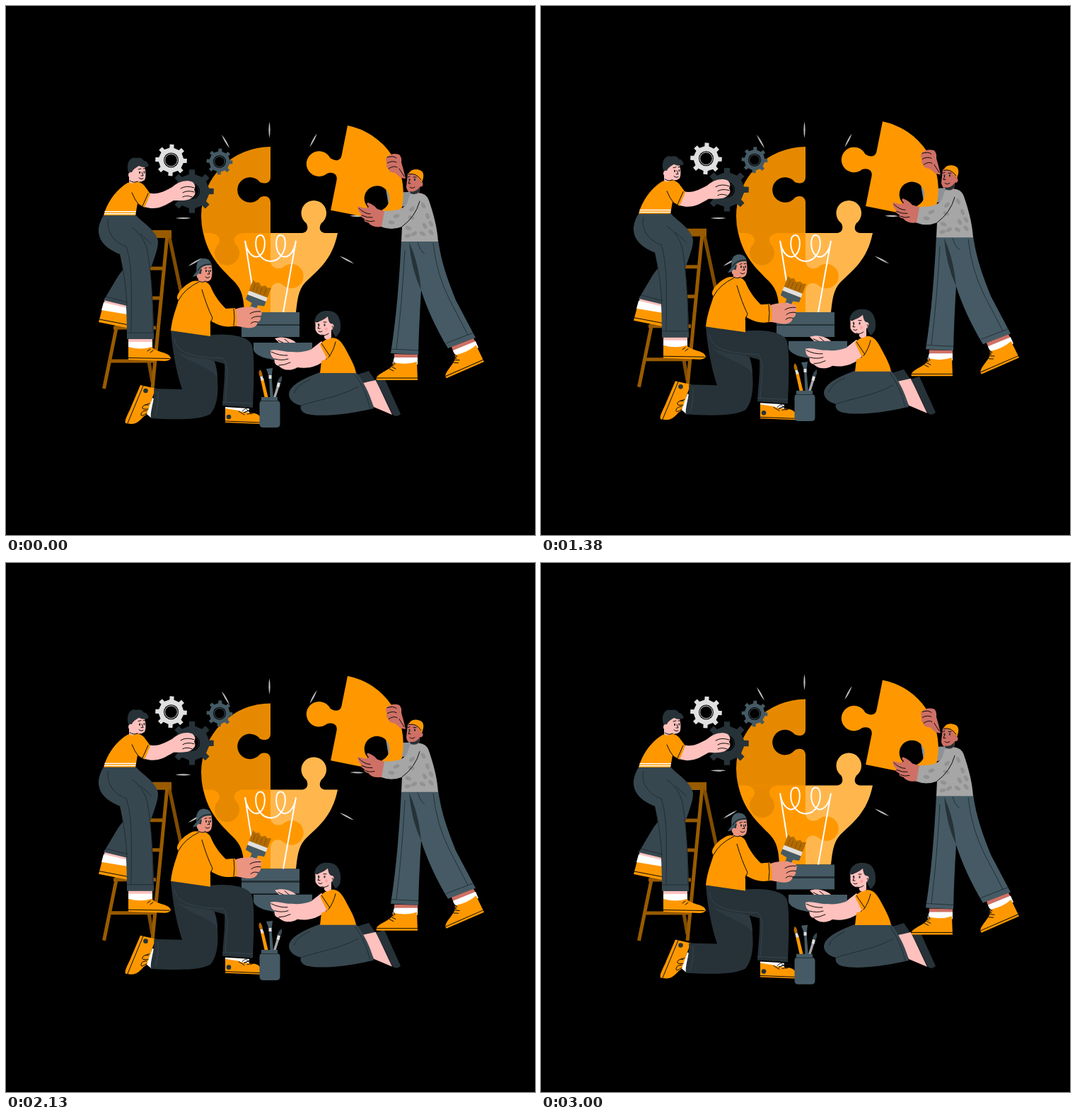
Write an HTML page that moves like this. It is 748 px wide and 748 px high and loops after 3040 ms.

```html
<!DOCTYPE html>
<html lang="en">
<head>
<meta charset="utf-8">
<title>Building an idea</title>
<style>
  html, body { margin: 0; width: 100%; height: 100%; overflow: hidden; background: #000; }
  svg { display: block; width: 100vw; height: 100vh; }
  .or { fill: #ff9800; } .or2 { fill: #e68900; } .or3 { fill: #ffb74d; }
  .dk { fill: #263238; } .md { fill: #37474f; } .sl { fill: #455a64; }
  .pk { fill: #ffc1bd; } .tan { fill: #eb9481; } .br { fill: #ce7065; }
  .gr { fill: #a6a6a6; } .wh { fill: #fff; } .lt { fill: #e0e0e0; }
  .ln { fill: none; stroke: #0b0b0b; stroke-width: 1; stroke-linecap: round; stroke-linejoin: round; }
  .seam { fill: none; stroke: #1c262b; stroke-width: .8; }
  .seam2 { fill: none; stroke: #3a4a52; stroke-width: .8; }
  .wood { fill: none; stroke: #995b00; stroke-width: 5; }
  .back { stroke: #804c00; }
  .wire { fill: none; stroke: #fff; stroke-width: 2; stroke-linecap: round; }
</style>
</head>
<body>
<svg viewBox="0 0 748 748">
  <defs>
    <g id="shoe">
      <path class="or" d="M0 0H-58C-61-7-47-11-38-18L-34-25Q-16-21-1-26Z"/>
      <path class="ln" d="M0-3H-58M-34-20q-10-11-11-8t10 7q-10 3-12 2M-32-22q-4-9-6-8t4 8M-40-16l6 3M-37-19l6 3"/>
    </g>
  </defs>

  <g id="bulb">
    <g id="rays" fill="#bdbdbd"></g>
    <path class="or2" d="M374 199V242C374 251 366 252 359 249A17.8 17.8 0 1 0 359 271C366 267 374 269 374 278V322H279Q276 310 276 297A98 98 0 0 1 374 199Z"/>
    <path class="or" d="M279 321H374V433H337C336 414 334 402 324 391C308 374 287 358 279 321Z"/>
    <path class="or2" d="M287 321C296 321 305 326 301 336A17.5 17.5 0 1 0 324 336C320 326 328 321 338 321Z"/>
    <path class="or3" d="M374 321H417C427 321 428 313 424.500 307A17.800 17.800 0 1 1 446 307C442 313 443 321 453 321H469C461 360 441 373 423 391C413 402 412 416 410 433H374Z"/>
    <path class="or" d="M374 361C375 370 383 373 391 370A17.300 17.300 0 1 1 391 394C383 389 375 393 374 403Z"/>
    <path class="wire" d="M354 433L338 332C341 352 352 358 359 353C368 346 368 324 360 324C351 324 352 342 357 350C362 358 368 361 374 361C381 361 387 357 391 350C396 342 397 324 388 324C380 324 380 346 389 353C396 358 407 352 410 332L392 433"/>
    <path class="sl" d="M333 433H415V450H333ZM333 452H415V468H333Z"/>
    <path class="dk" d="M333 450H415V452H333Z"/>
  </g>

  <g id="climber">
    <path class="wood back" d="M230 322L249 412M202 503L207 532"/>
    <path class="wood" d="M182 328L138.500 541M228 324L207 541M196 371H221M192 413H217M152 455H212M146 502H210"/>
    <path fill="#995b00" d="M180 317H234V328H180Z"/>
    <g id="gears"></g>
    <path class="or" d="M136 428L171 435V455L131 447Z"/>
    <path class="ln" d="M132 443L171 450.500"/>
    <path class="pk" d="M140 413L171 420V430L138 424Z"/>
    <path class="wh" d="M138 419L171 427V436L135 430Z"/>
    <path class="md" d="M213 345C206 375 190 402 171 424L138 416C150 398 155 385 166 372L180 330Z"/>
    <path class="md" d="M150 296H184C190 304 213 317 215 333C215 345 210 355 204 367L180 345Z"/>
    <path class="md" d="M138 296H180C190 312 199 330 201 350C206 385 209 430 209 471H171C171 430 169 385 161 351C146 345 129 334 131 314Q133 303 138 296Z"/>
    <path class="seam" d="M178 313C190 322 199 335 201 352C206 385 208 430 208 462M171 462H209M145 301C141 318 152 334 170 340C180 370 177 420 177 461M190 322L206 337M141 411L172 419M164 365C168 385 170 405 171 424"/>
    <path class="pk" d="M173 471H207V478H173Z"/>
    <path class="wh" d="M173 475H207V486H173Z"/>
    <path class="or" d="M173 482Q191 487 206 482C212 490 231 489 233 498Q231 502 224 502L173 500Z"/>
    <path class="ln" d="M173 497.500L231 498.500M204 485l-4 3M208 487l-4 3"/>
    <path class="pk" d="M201 264C213 268 224 262 235 256C244 248 256 245 264 249C268 253 268 256 266 260C269 264 267 268 264 270C259 276 246 275 237 275C222 284 211 290 193 283Z"/>
    <path class="ln" d="M266 257Q255 253 247 258M266 263Q256 260 250 264M263 270Q255 267 250 270"/>
    <path class="or" d="M138 296C143 278 155 260 172 250C183 246 193 249 197 256Q201 261 204 266L196 285L186 279L183 296Z"/>
    <path class="wh" d="M139.500 290H184V291.500H139.500ZM139 293H183.500V294.500H139Z"/>
    <path class="ln" d="M178 264Q182 274 187 280M201 265L193 283"/>
    <path class="pk" d="M174 230Q185 219 196 227Q199 240 196 246Q191 250 184 248Q178 253 174 249Z"/>
    <path class="dk" d="M175 239C171 232 171 224 174 219Q178 213 184 215Q192 213 195 219Q199 218 202 226Q195 230 188 226Q181 230 179 233Q177 238 175 239Z"/>
    <circle class="pk" cx="177" cy="239" r="4"/>
    <path class="ln" d="M187 231l4-1M194 230l3 0M192 235l2 5-3 0M188 243q3 3 6 1M175 247q6 4 11 1"/>
    <path class="dk" d="M188 234h2v3h-2ZM194.500 233.500h1.800v3h-1.800Z"/>
  </g>

  <g id="painter">
    <path class="or" d="M190 536L212 541C208 551 205 557 204 566C203 575 198 578 194 581C188 588 183 591 177 591L169 590C167 585 173 577 178 564Z"/>
    <path class="wh" d="M207 554L211 556L206 583L199 577Z"/>
    <path class="ln" d="M194 537L172 590M201 564q-6-1-8 3t8 3M199 572q-7 0-8 5t8-1M203 562l-6 2"/>
    <circle class="dk" cx="197.500" cy="544" r="3.300"/>
    <path class="dk" d="M233 458L290 465C315 463 343 466 348 480C352 498 350 535 349 568L306 565C307 545 310 525 309 506L295 502C300 523 304 560 289 577C273 586 235 585 205 583C203 573 211 557 209 541L249 542C240 515 235 485 233 458Z"/>
    <path fill="#2d3a41" d="M243 490C265 500 287 496 295 504Q299 514 299 526C289 510 260 506 243 490Z"/>
    <path class="seam2" d="M238 469C240 487 255 497 307 498Q313 505 313 520L310 560M306 560L349 562M215 545Q216 565 211 579"/>
    <path class="wh" d="M310 567L344 569V577H310Z"/>
    <path class="or" d="M310 569L329 572C338 577 356 572 360 582V591L310 589Z"/>
    <path class="ln" d="M310 587L360 589M334 573q6-6 10-4t-8 6q14-6 18-3t-13 5M329 573l8 5M340 570l7 7"/>
    <circle class="dk" cx="315" cy="581" r="3.300"/>
    <g transform="translate(354.500 413) rotate(21)">
      <path fill="#b36b00" d="M-14-5V-22L-9-20L-5-22L0-18L5-21L9-19L14-21V-5Z"/>
      <path class="lt" d="M-14-6H14V0H-14Z"/>
      <path class="sl" d="M-14 0H14V7Q9 8 5 9V24H-4V9Q-10 8-14 7Z"/>
      <path class="ln" d="M-9-8v-9M-4-8v-8M2-8v-8M8-8v-9" opacity=".25"/>
      <path class="lt" d="M-3 14H4V25H-3Z"/>
    </g>
    <path class="tan" d="M322 430C333 424 349 425 358 428C363 431 362 436 360 439C361 444 358 446 356 447C355 454 348 456 340 455L322 452Z"/>
    <path class="ln" d="M360 432Q351 431 345 435M360 439Q351 438 347 442M356 447Q350 445 346 449"/>
    <path class="or" d="M233 459C235 440 241 427 244 416C238 412 246 400 257 393Q267 386 274 390Q283 387 289 396C294 409 304 422 311 428L324 427Q328 440 326 452C310 456 300 451 289 445V467Z"/>
    <path class="ln" d="M273 390Q252 400 244 416M277 401Q284 425 292 441L289 449M322 428Q324 440 322 452"/>
    <path class="tan" d="M270 370L290 364Q293 378 290 386Q286 391 281 389Q277 393 272 389Z"/>
    <path class="dk" d="M269 372H277L275 382L271 386Q268 380 269 372Z"/>
    <path class="sl" d="M270 375C267 362 274 356 281 357Q289 357 291 367Q281 366 276 371L272 381L264 383Q266 379 270 375Z"/>
    <circle class="tan" cx="273.500" cy="382" r="3.600"/>
    <path class="ln" d="M271 374Q276 364 290 365M281 371l3-1M287 370l3 0M286 374l2 5-3 0M282 383q3 3 6 0M273 389q5 3 9 0"/>
    <path class="dk" d="M282 373h2v3h-2ZM288 373h1.800v3h-1.800Z"/>
  </g>

  <g id="girl">
    <path class="pk" d="M380 470C391 466 405 470 411 477H387ZM432 485L446 474L452 482L436 494Z"/>
    <path class="ln" d="M385 473l9 4M394 471l7 6"/>
    <path class="sl" d="M350 476H433V485C431 494 412 501 392 501C370 501 350 494 350 485Z"/>
    <path class="dk" d="M497 521L513 516L523 531L506 536Z"/>
    <path class="pk" d="M505 533L523 529L546 578L520 567Z"/>
    <path class="dk" d="M523 530L535 526L558 577Q552 583 546 577Q537 556 523 530Z"/>
    <path class="md" d="M444 518H495C503 527 515 548 520 569C490 576 450 582 426 577C416 574 416 567 417 565C408 563 400 557 400 549C401 535 425 525 444 518Z"/>
    <path class="seam" d="M417 565C440 557 475 552 498 538M494 522Q508 541 515 569M430 528Q410 537 407 548"/>
    <path class="pk" d="M374 487C382 484 396 490 404 489C420 491 436 486 446 477L460 489C449 509 428 514 412 511C402 517 391 515 386 509C379 508 379 501 380 499C374 496 374 490 374 487Z"/>
    <path class="ln" d="M375 489Q387 495 398 494M380 499Q390 502 399 499M386 508Q394 508 402 504"/>
    <path class="or" d="M444 479Q449 472 457 470C466 467 473 472 479 483C488 500 493 508 495 519H444L446 502L454 499Z"/>
    <path class="ln" d="M446 477L458 495M456 497Q463 488 466 475"/>
    <path class="dk" d="M437 450C434 439 444 430 454 431C468 430 474 442 473 455Q473 463 466 468Q461 460 457 452Z"/>
    <path class="pk" d="M437.500 447Q447 446 455 439Q456 447 459 449Q465 449 463 455Q462 458 460 458V469Q453 474 450 469V466Q441 466 437.500 458Z"/>
    <path class="ln" d="M439 447l3-1M449 447l4 0M443 451l-2 5 3 0M442 460q3 2 5 0M446 465q6 2 10-2M461 453q2-1 1 3"/>
    <path class="dk" d="M441 449h1.800v3h-1.800ZM449.500 449.500h2v3h-2Z"/>
    <circle cx="453" cy="457" r="2.400" fill="#fba9a4"/>
  </g>

  <g id="carrier">
    <path class="sl" d="M559 331H611C616 365 625 388 636 416L664 469L625 484C609 458 594 425 587 402Q584 450 583 493L544 491C552 440 556 390 559 331Z"/>
    <path class="dk" d="M570 334L575 346Q584 370 587 402Q573 372 570 334Z"/>
    <path class="seam" d="M544 485L583 487M622 477L661 462M582 334Q586 347 592 350M604 335Q609 380 627 415L653 465M564 345Q560 420 552 485"/>
    <path class="br" d="M549 492L582 493V500H549ZM630 482L661 470L665 477L633 490Z"/>
    <path class="wh" d="M549 497H582V507L546 506ZM632 487L664 474L668 483L637 499Z"/>
    <use href="#shoe" x="582" y="529"/>
    <use href="#shoe" transform="translate(676 503) rotate(-23.600)"/>
    <path fill="#8c9298" d="M537 258Q552 266 578 262L580 278Q560 287 541 282Z"/>
    <path class="or" transform="translate(483 169) rotate(11.300)" d="M0 0A98 98 0 0 1 98 98Q98 110 95 122H79C69 122 68 114 71.700 107A17.800 17.800 0 1 0 50 107C54 114 53 122 43 122H0V79C0 70-8 68-15 72A17.800 17.800 0 1 1-15 50C-8 53 0 52 0 43Z"/>
    <path class="br" d="M539 213Q546 207 556 210Q560 214 559 221Q562 231 565 244L558 243L550 236Q540 235 541 230Q536 227 539 222Q535 217 539 213Z"/>
    <path class="ln" d="M539 214Q548 211 552 215M539 222Q547 218 552 221M541 230Q548 225 553 228M556 230l7 11"/>
    <path class="gr" d="M571 267C584 261 595 265 598 275C605 295 610 315 611 333H559L560 312Q545 318 530 312L534 290C548 289 560 290 567 279Z"/>
    <g id="spots" fill="#929292"></g>
    <path class="ln" d="M585 276Q579 298 560 312"/>
    <path class="br" d="M498 283Q510 288 513 284Q508 279 512 278Q520 281 525 287L535 290L531 312Q518 314 512 306Q505 305 507 301Q500 298 502 294Q496 288 498 283Z"/>
    <path class="ln" d="M499 286Q507 294 515 294M503 296Q511 300 518 299M508 303Q515 306 521 304"/>
    <path class="br" d="M568 237Q578 232 588 240L584 264Q579 268 573 264Q567 263 566 256Z"/>
    <path class="dk" d="M571 262Q579 264 585 256L584 263Q579 268 572 265Z"/>
    <path class="or" d="M569 238Q572 230 581 231Q592 232 590 243L588 250L584 244Q578 235 569 238Z"/>
    <circle class="br" cx="586" cy="252" r="3.500"/>
    <path class="ln" d="M569 238Q580 235 587 246M568 242l3-1M576 242l4 0M571 246l-2 5 3 0M571 256q3 3 7 0"/>
    <path class="dk" d="M569.500 244h1.800v3h-1.800ZM577 244h2v3h-2Z"/>
  </g>

  <g id="jar">
    <path class="or" d="M360 528L364 526L371 555H366Z"/>
    <path class="lt" d="M359 524L362.500 523L364.500 529L361 530Z"/>
    <path fill="#b36b00" d="M359 514Q363 518 362.500 523L359 524Q356 519 359 514Z"/>
    <path class="sl" d="M372 524H375.500L378 555H373.500ZM368 513L377 512L375.500 524H372Z"/>
    <path class="lt" d="M371.500 522H375.500V527H371.500Z"/>
    <path class="gr" d="M383 537L386.500 538L381 555H377.500Z"/>
    <path class="lt" d="M384 532L388 533L386.500 539L382.500 538Z"/>
    <path class="md" d="M390 523Q391 529 388 533L384 532Q385 526 390 523Z"/>
    <path class="sl" d="M361 553H384V558Q387.500 559 387.500 563V591Q387.500 596 382 596H364Q358.500 596 358.500 591V563Q358.500 559 361 558Z"/>
    <path class="seam" d="M361 558.500H384"/>
  </g>
</svg>
<script>
const $ = id => document.getElementById(id);

// Slim lens: centre, length, angle.
const ray = ([x, y, len, deg]) => {
  const h = len / 2;
  return `<path transform="translate(${x} ${y}) rotate(${deg})" d="M${-h} 0Q0-2.200 ${h} 0Q0 2.200 ${-h} 0Z"/>`;
};
$('rays').innerHTML = [
  [372.5, 175, 23, 90], [310.5, 191.5, 22, 60], [434.5, 190, 22, 118], [250.5, 300, 22, 0],
  [482, 359, 23, 28], [267.5, 362, 23, -30], [496, 297, 20, 2]
].map(ray).join('');

// Gear: centre, outer radius, hole radius, colour, turn.
const TEETH = 8;
const gear = ([x, y, r, hole, fill, turn]) => {
  const step = 2 * Math.PI / TEETH;
  const at = (a, k) => `${(x + Math.cos(a) * r * k).toFixed(1)} ${(y + Math.sin(a) * r * k).toFixed(1)}`;
  const pts = [];
  for (let i = 0; i < TEETH; i++) {
    const a = i * step + turn;
    pts.push(at(a - step * .22, .79), at(a - step * .17, 1), at(a + step * .17, 1), at(a + step * .22, .79));
  }
  return `<path fill="${fill}" d="M${pts.join('L')}Z"/>
    <circle cx="${x}" cy="${y}" r="${hole}"/>
    <circle cx="${x}" cy="${y}" r="${hole - 1.6}" fill="none" stroke="${fill}" stroke-width="1"/>`;
};
$('gears').innerHTML = [
  [233.5, 218, 22.5, 10.5, '#e0e0e0', .05],
  [302, 220, 18.5, 9, '#455a64', .05],
  [263, 262, 31, 11, '#263238', 0]
].map(gear).join('');

$('spots').innerHTML = [
  [569, 314, 20], [577, 322, -30], [592, 311, 60], [601, 320, 50], [568, 325, -10], [589, 322, 30],
  [590, 282, 60], [596, 297, 70], [574, 287, -40], [573, 299, 20], [552, 297, -20], [545, 306, 10], [601, 308, 60]
].map(([x, y, a]) => `<ellipse rx="4.500" ry="2.600" transform="translate(${x} ${y}) rotate(${a})"/>`).join('');

// Each group bobs up and back down once its turn has come.
const LOOP = 3040, HALF = 1500, RISE = 10;
const starts = { jar: 30, painter: 535, carrier: 535, climber: 1040, girl: 1040, bulb: 2040 };

function draw(now) {
  const t = now % LOOP;
  for (const id in starts) {
    const p = Math.max(0, t - starts[id]);
    const y = -RISE * Math.max(0, 1 - Math.abs(p / HALF - 1));
    $(id).setAttribute('transform', `translate(0 ${y.toFixed(2)})`);
  }
}

const begin = performance.now();
draw(0);
requestAnimationFrame(function tick() {
  draw(performance.now() - begin);
  requestAnimationFrame(tick);
});
</script>
</body>
</html>
```
